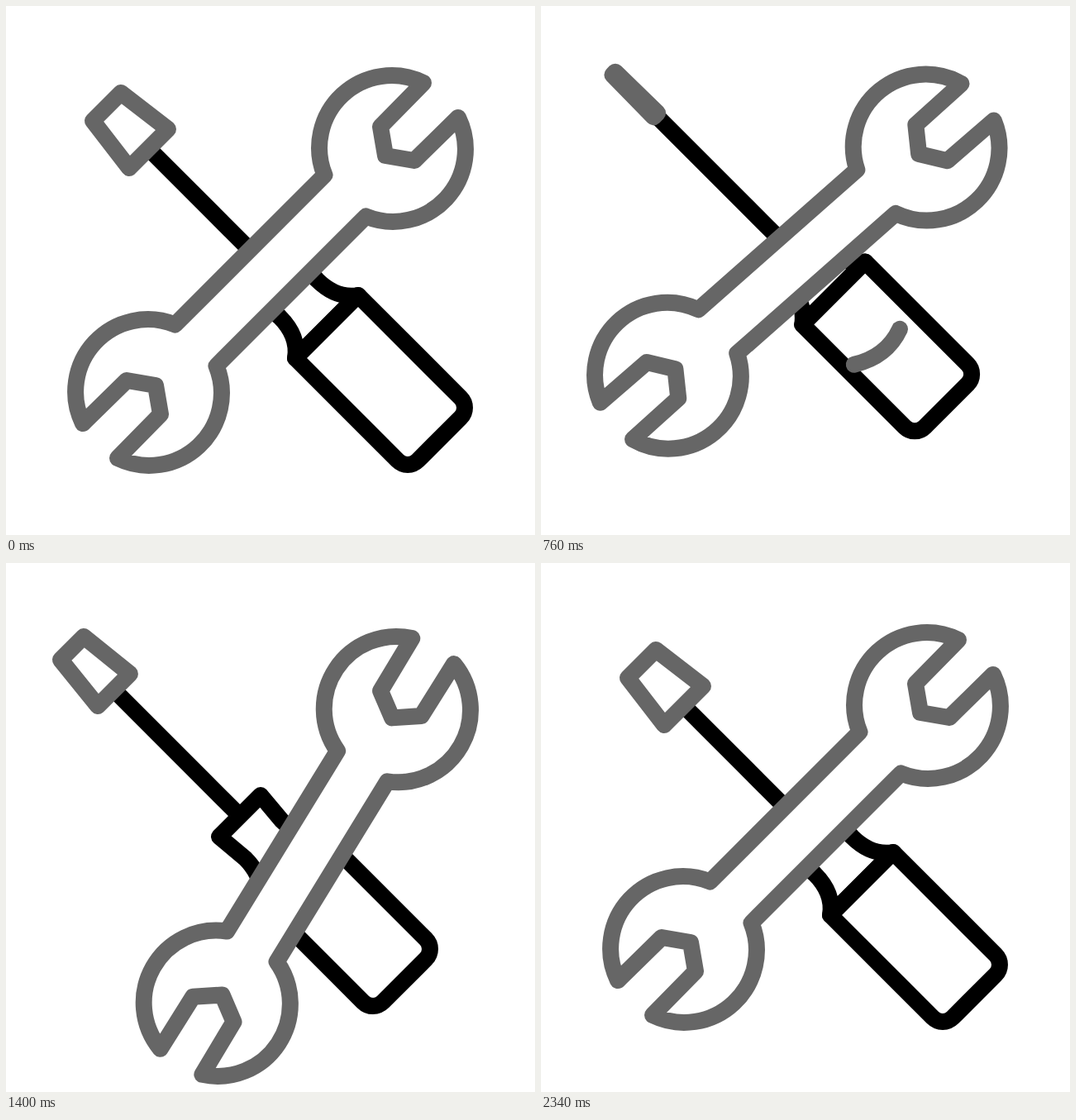
These frames come from a looping animation (640x640 px, 2.4 s). An HTML page:

```html
<!DOCTYPE html>
<html lang="en">
<head>
<meta charset="utf-8">
<title>Tools</title>
<style>
  html, body { margin: 0; width: 100%; height: 100%; overflow: hidden; background: #fff; }
  svg { display: block; width: 100vw; height: 100vh; }
  path { fill: #fff; stroke: #000; stroke-width: 20; stroke-linecap: round; stroke-linejoin: round; }
  .grey { stroke: #666; }
  .line { fill: none; }
</style>
</head>
<body>
<svg viewBox="0 0 640 640">
  <g id="driver">
    <path class="line" d="M172.5 172.5 L325 325"/>
    <path d="M350 300 L376 331 C391 346 408 353 426 350 L350 426 C353 408 346 391 331 376 L300 350 Z"/>
    <path d="M426 350 L550 474 A17 17 0 0 1 550 498 L498 550 A17 17 0 0 1 474 550 L350 426 Z"/>
    <path id="glint" class="grey line" pathLength="1" d="M397 477 Q469 469 477 397"/>
    <path id="blade" class="grey"/>
  </g>
  <path id="wrench" class="grey" d="M505 93 A87.5 87.5 0 0 0 385.5 204.5 L204.5 385.5 A87.5 87.5 0 0 0 93 505
    L146 453 L181 459 L187 494 L135 547 A87.5 87.5 0 0 0 254.5 435.5 L435.5 254.5
    A87.5 87.5 0 0 0 547 135 L494 187 L459 181 L453 146 Z"/>
</svg>
<script>
  const LOOP = 2400;
  const [driver, glint, blade, wrench] =
    ['driver', 'glint', 'blade', 'wrench'].map(id => document.getElementById(id));

  // [ms, degrees]
  const swing = [[0, 0], [521, -15], [935, 15], [1340, -15], [1750, 10.4], [2180, 0]];
  // [ms, half turns done]
  const turns = [0, 480, 948, 1345, 1767, 2190].map((t, i) => [t, i]);
  // [ms, x, y]
  const route = [[0, 0, 0], [240, -6.5, -9], [560, -27, -35], [980, -38.5, -40],
                 [1400, -42, -19], [1800, -30, 2], [2340, 0, 0]];

  const clamp = u => Math.min(1, Math.max(0, u));
  const smooth = u => (u = clamp(u), u * u * (3 - 2 * u));

  function between(keys, t, ease) {
    const i = Math.max(1, keys.findIndex(k => k[0] > t));
    if (t >= keys[keys.length - 1][0]) return keys[keys.length - 1][1];
    const [a, b] = [keys[i - 1], keys[i]];
    return a[1] + (b[1] - a[1]) * ease((t - a[0]) / (b[0] - a[0]));
  }

  // Hermite curve through the keys, at rest at both ends
  function spline(keys, axis, t) {
    const last = keys.length - 1;
    if (t >= keys[last][0]) return keys[last][axis];
    const i = keys.findIndex(k => k[0] > t) - 1;
    const slope = j => j < 1 || j >= last ? 0 :
      (keys[j + 1][axis] - keys[j - 1][axis]) / (keys[j + 1][0] - keys[j - 1][0]);
    const [a, b] = [keys[i], keys[i + 1]];
    const span = b[0] - a[0], u = (t - a[0]) / span, v = 1 - u;
    return a[axis] + (b[axis] - a[axis]) * smooth(u)
      + span * u * v * (v * slope(i) - u * slope(i + 1));
  }

  // The blade lies along the diagonal; flat = 1, edge-on = 0
  function bladePath(flat) {
    const near = 17 * flat, far = 23.5 * flat, p = 122, q = 172.5;
    return `M${p + near} ${p - near} L${p - near} ${p + near} L${q - far} ${q + far} L${q + far} ${q - far} Z`;
  }

  function draw(now) {
    const t = now % LOOP;
    wrench.setAttribute('transform', `rotate(${between(swing, t, smooth)} 490 150)`);
    driver.setAttribute('transform', `translate(${spline(route, 1, t)} ${spline(route, 2, t)})`);

    const phase = between(turns, t, u => u) % 1;
    blade.setAttribute('d', bladePath(smooth(Math.abs(1 - 2 * phase))));

    // a stroke crosses the grip on each half turn
    const head = smooth((phase - .2) / .62), tail = smooth((phase - .5) / .45);
    glint.style.strokeDasharray = `${head - tail} 2`;
    glint.style.strokeDashoffset = -tail;
    glint.style.visibility = head > tail ? 'visible' : 'hidden';
  }

  function tick() {
    draw(performance.now());
    requestAnimationFrame(tick);
  }
  tick();
</script>
</body>
</html>
```
